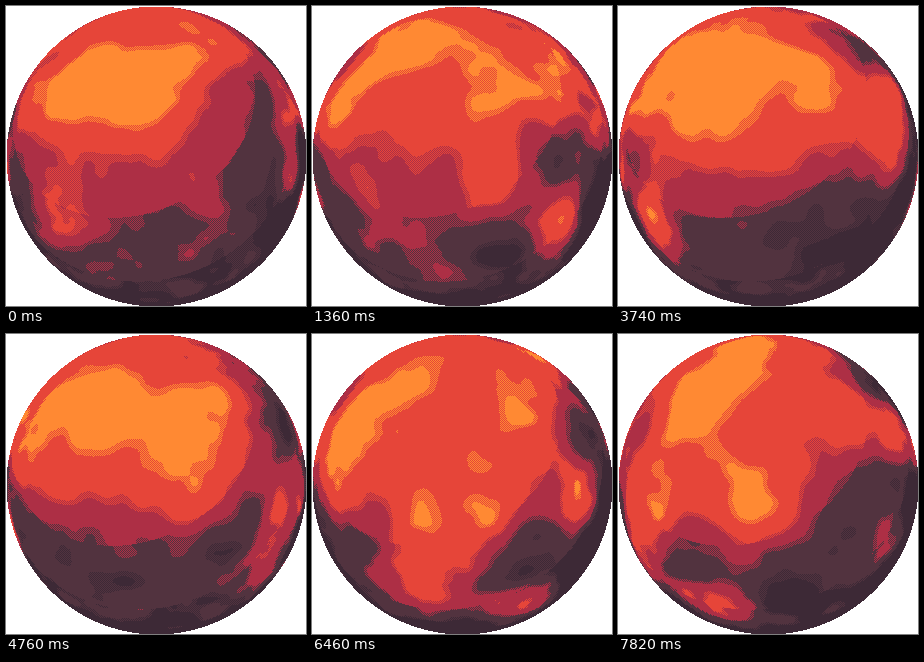
Animation of 300 by 300 pixels, one loop 7.99 s. Source, as an HTML page with a canvas:

```html
<!DOCTYPE html>
<html>
<head>
<meta charset="utf-8">
<title>Rotating dry planet</title>
<style>
  html, body { margin: 0; width: 100%; height: 100%; overflow: hidden; background: #fff; }
  canvas { display: block; width: 300px; height: 300px; image-rendering: pixelated; }
</style>
</head>
<body>
<canvas width="300" height="300"></canvas>
<script>
const SIZE = 300, STEP_MS = 170, STEPS = 47, STEPS_PER_TURN = 60;
const LIGHT = { u: 0.4, v: 0.3 };
const PALETTE = [[255, 137, 51], [230, 69, 57], [173, 47, 69], [82, 51, 63], [61, 41, 54]];

// Key points of the terrain as [longitude, latitude]; a full turn is 200 wide, pole to pole is 100.
const BASINS = [
  [25, 38], [36, 36], [48, 36], [63, 23], [31, 59], [82, 54], [81, 37], [94, 38],
  [102, 26], [96, 64], [112, 43], [120, 34], [134, 36], [149, 49], [150, 36], [166, 69],
  [186, 34], [181, 52], [172, 60], [190, 76], [198, 14], [1, 50]
];
const RIDGES = [
  [43, 23], [38, 56], [48, 59], [62, 44], [24, 50], [28, 25], [72, 54], [70, 36],
  [94, 49], [84, 65], [109, 59], [120, 63], [132, 63], [141, 60], [142, 24], [156, 60],
  [175, 32], [190, 64], [3, 39], [6, 69], [14, 59]
];
const TURN = 200, SPREAD = 4.5;
const BASE_HEIGHT = 0.42, RELIEF = 0.28, SOFTNESS = 0.25;

const fract = v => v - Math.floor(v);
const mix = (a, b, t) => a + (b - a) * t;
const smooth = t => t * t * (3 - 2 * t);
const random = (x, y) => fract(Math.sin((x % 16) * 12.9898 + (y % 8) * 78.233) * 437.5453);

function noise(x, y) {
  const ix = Math.floor(x), iy = Math.floor(y);
  const sx = smooth(x - ix), sy = smooth(y - iy);
  return mix(
    mix(random(ix, iy), random(ix + 1, iy), sx),
    mix(random(ix, iy + 1), random(ix + 1, iy + 1), sx), sy) - 0.5;
}

// Total influence of nearby key points, wrapping around the planet.
function influence(points, lon, lat) {
  let sum = 0;
  for (const [x, y] of points) {
    const gap = Math.abs(lon - x), dx = Math.min(gap, TURN - gap), dy = lat - y;
    const d2 = (dx * dx + dy * dy) / (SPREAD * SPREAD);
    if (d2 < 12) sum += Math.exp(-d2 / 2);
  }
  return sum;
}

function height(u, v) {
  const lon = u * 100 % TURN, lat = v * 100;
  const high = influence(RIDGES, lon, lat), low = influence(BASINS, lon, lat);
  const relief = RELIEF * (high - low) / (SOFTNESS + high + low);
  const detail = 0.16 * noise(u * 16, v * 16) + 0.1 * noise(u * 32, v * 32);
  return Math.max(0.02, BASE_HEIGHT + relief + detail);
}

// Maps a pixel onto the sphere: surface coordinates and distance shading.
function project(px, py) {
  const cx = px / SIZE * 2 - 1, cy = py / SIZE * 2 - 1;
  const z = Math.sqrt(Math.max(0, 1 - cx * cx - cy * cy));
  const u = cx / (z + 1) / 2 + 0.5, v = cy / (z + 1) / 2 + 0.5;
  let shade = smooth((Math.hypot(u - LIGHT.u, v - LIGHT.v) + 0.3) / 1.5);
  if (shade < 0.362) shade *= 0.9;
  if (shade < 0.525) shade *= 0.9;
  return { px, py, u, v, shade };
}

const ctx = document.querySelector('canvas').getContext('2d');
const image = ctx.createImageData(SIZE, SIZE);
const disc = [];
for (let y = 0; y < SIZE; y++) {
  for (let x = 0; x < SIZE; x++) {
    if (Math.hypot(x / SIZE - 0.5, y / SIZE - 0.5) <= 0.49999) disc.push(project(x, y));
  }
}

function draw(step) {
  const turn = 2 * step / STEPS_PER_TURN;
  for (const { px, py, u, v, shade } of disc) {
    let dark = shade * Math.pow(height(u + turn, v), 0.8) * 3.5;
    if ((px + py) % 2 === 0) dark = (dark + 0.02) * 1.05;
    const color = PALETTE[Math.min(4, Math.floor(dark * 4))];
    image.data.set([...color, 255], (py * SIZE + px) * 4);
  }
  ctx.putImageData(image, 0, 0);
}

let shown = -1;
function tick() {
  const step = Math.floor(performance.now() / STEP_MS) % STEPS;
  if (step !== shown) draw(shown = step);
  requestAnimationFrame(tick);
}
tick();
</script>
</body>
</html>
```
